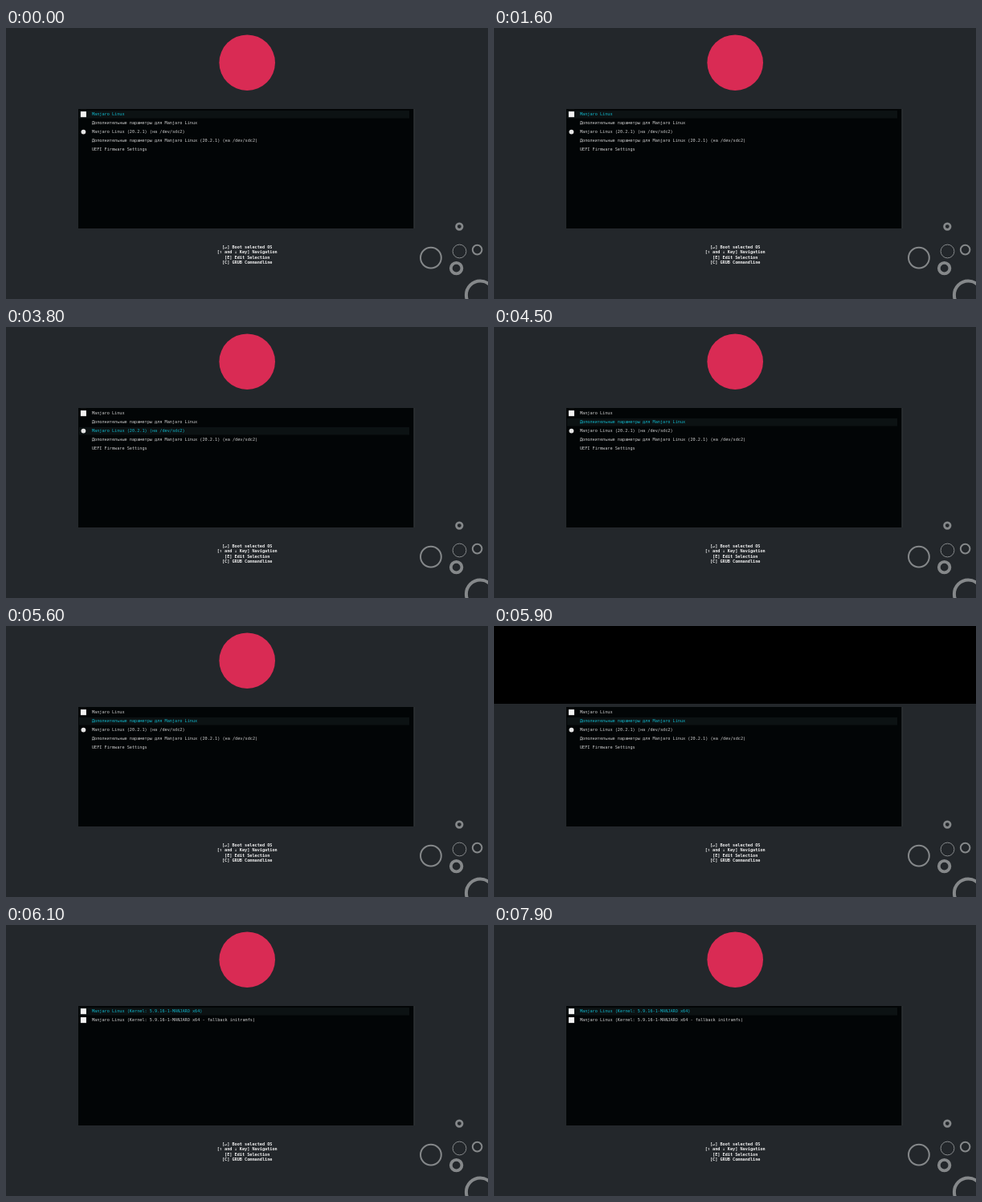
Animation, 600 px wide and 338 px high, one loop 8 s. Source, as an HTML page with a canvas:

```html
<!DOCTYPE html>
<html lang="ru">
<head>
<meta charset="utf-8">
<title>Boot menu</title>
<style>
  html, body { margin: 0; width: 100%; height: 100%; overflow: hidden; background: #23272b; }
  canvas { display: block; width: 600px; height: 338px; }
</style>
</head>
<body>
<canvas id="stage"></canvas>
<script>
const LOOP = 8000;
const W = 600, H = 338;
const CELL = 0.3125; // 1920-wide screen shown at 600
const canvas = document.getElementById('stage');
const dpr = window.devicePixelRatio || 1;
canvas.width = Math.round(W * dpr);
canvas.height = Math.round(H * dpr);
const ctx = canvas.getContext('2d');

const mainMenu = [
  { text: 'Manjaro Linux', icon: 'square' },
  { text: 'Дополнительные параметры для Manjaro Linux' },
  { text: 'Manjaro Linux (20.2.1) (на /dev/sdc2)', icon: 'dot' },
  { text: 'Дополнительные параметры для Manjaro Linux (20.2.1) (на /dev/sdc2)' },
  { text: 'UEFI Firmware Settings' }
];
const subMenu = [
  { text: 'Manjaro Linux (Kernel: 5.9.16-1-MANJARO x64)', icon: 'square' },
  { text: 'Manjaro Linux (Kernel: 5.9.16-1-MANJARO x64 - fallback initramfs)', icon: 'square' }
];
const help = [
  '[↵] Boot selected OS',
  '[↑ and ↓ Key] Navigation',
  '[E] Edit Selection',
  '[C] GRUB Commandline'
];

// x, y, radius, line width
const rings = [
  [564.3, 247.6, 3.8, 2.7],
  [528.9, 286.6, 12.9, 2],
  [564.5, 278.5, 8.4, 1],
  [586.6, 276.6, 5.8, 2],
  [560.6, 299.6, 6.8, 3.8],
  [590.3, 333, 17.4, 4]
];

// Time of each key press and the row it selects
const moves = [[0, 0], [3100, 1], [3700, 2], [3900, 3], [4300, 2], [4500, 1], [4800, 0], [5400, 1]];
const CLEAR = 5900, BLACK = 6000, SUBMENU = 6100;

function rect(x, y, w, h, color) {
  ctx.fillStyle = color;
  ctx.fillRect(x, y, w, h);
}

function disc(x, y, r, color) {
  ctx.fillStyle = color;
  ctx.beginPath();
  ctx.arc(x, y, r, 0, Math.PI * 2);
  ctx.fill();
}

function text(str, x, y, color, align = 'left', weight = '') {
  ctx.save();
  ctx.translate(x, y);
  ctx.scale(CELL, CELL);
  ctx.font = weight + ' 16.61px "DejaVu Sans Mono", monospace';
  ctx.textAlign = align;
  ctx.fillStyle = color;
  ctx.fillText(str, 0, 0);
  ctx.restore();
}

function drawBackdrop() {
  rect(0, 0, W, H, '#23272b');
  disc(300.2, 43.2, 34.8, '#d92b54');
  ctx.strokeStyle = '#85888a';
  for (const [x, y, r, line] of rings) {
    ctx.lineWidth = line;
    ctx.beginPath();
    ctx.arc(x, y, r, 0, Math.PI * 2);
    ctx.stroke();
  }
  help.forEach((line, i) => text(line, 300.2, 275 + i * 6.25, '#f0f0f0', 'center', 'bold'));
}

function drawMenu(items, selected) {
  rect(90, 101, 417.6, 149, '#020506');
  rect(507.6, 101, 0.8, 149, '#3a3f43');
  rect(91, 103 + selected * 10.95, 411, 9.6, '#0c1213');
  items.forEach((item, i) => {
    const y = 107.7 + i * 10.95;
    if (item.icon === 'square') rect(92.9, y - 3.6, 7, 7.1, '#f2f2f2');
    if (item.icon === 'dot') disc(96.4, y, 2.9, '#e4e4e4');
    text(item.text, 107, y + 1.75, i === selected ? '#10b8cc' : '#cfcfcf');
  });
}

function draw(t) {
  ctx.setTransform(canvas.width / W, 0, 0, canvas.height / H, 0, 0);
  if (t >= BLACK && t < SUBMENU) {
    rect(0, 0, W, H, '#000');
    return;
  }
  drawBackdrop();
  if (t >= SUBMENU) {
    drawMenu(subMenu, 0);
    return;
  }
  drawMenu(mainMenu, moves.filter(([at]) => at <= t).pop()[1]);
  if (t >= CLEAR) rect(0, 0, W, 97, '#000');
}

const start = performance.now();
function tick() {
  draw((performance.now() - start) % LOOP);
  requestAnimationFrame(tick);
}
tick();
</script>
</body>
</html>
```
